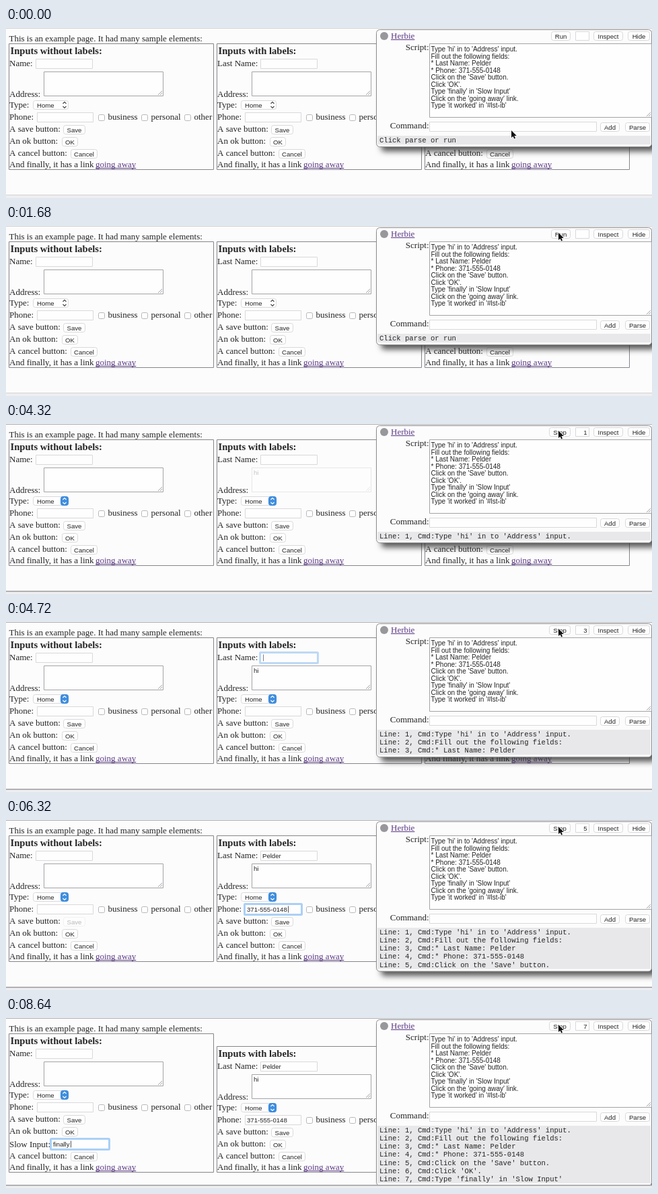
An HTML page with a canvas for the animation above (8720 ms loop, 960 by 254 pixels).

```html
<!DOCTYPE html>
<html lang="en">
<head>
<meta charset="utf-8">
<title>Form script demo</title>
<style>
html, body { margin: 0; width: 960px; height: 254px; overflow: hidden; background: #fcfcfc; }
canvas { display: block; }
</style>
</head>
<body>
<canvas id="stage" width="960" height="254"></canvas>
<script>
const ctx = document.getElementById('stage').getContext('2d');
const LOOP = 8720, STEP = 80;
const SERIF = '13px "Liberation Serif", serif';
const BOLD = 'bold 14.6px "Liberation Serif", serif';
const SANS = '9.6px "Liberation Sans", sans-serif';
const AREA = '10px "Liberation Sans", sans-serif';
const MONO = '10.55px "Liberation Mono", monospace';
const INK = '#242424', PAGE = '#fcfcfc', WHITE = '#fefefe', PALE = '#d9d9dc',
      EDGE = '#a4a4a8', LOG = '#e8e8ea', LINK = '#5c3a86';

const LAST = 'Pelder', PHONE = '371-555-0148';
const SCRIPT = [
  "Type 'hi' in to 'Address' input.",
  'Fill out the following fields:',
  '* Last Name: ' + LAST,
  '* Phone: ' + PHONE,
  "Click on the 'Save' button.",
  "Click 'OK'.",
  "Type 'finally' in 'Slow Input'",
  "Click on the 'going away' link.",
  "Type 'it worked' in '#lst-ib'"
];

// Start time of each script line, and the other events
const LINES = [4200, 4600, 4680, 5120, 6210, 7000, 8120];
const CLICK = 3200, SLOW = 8000, FADE = 160, GROW = 19;

function text(s, x, y, font = SERIF, color = INK, align = 'left') {
  ctx.font = font;
  ctx.fillStyle = color;
  ctx.textAlign = align;
  ctx.fillText(s, x, y);
  return ctx.measureText(s).width;
}

function box(x, y, w, h, fill, stroke, r = 0) {
  ctx.beginPath();
  ctx.roundRect(x + .5, y + .5, w - 1, h - 1, r);
  if (fill) { ctx.fillStyle = fill; ctx.fill(); }
  if (stroke) { ctx.strokeStyle = stroke; ctx.lineWidth = 1; ctx.stroke(); }
}

function faded(alpha, draw) {
  ctx.save();
  ctx.globalAlpha = alpha;
  draw();
  ctx.restore();
}

function button(label, x, y, w) {
  box(x, y, w, 14, WHITE, PALE, 3);
  text(label, x + w / 2, y + 10.5, SANS, INK, 'center');
}

function caret(x, y) {
  ctx.fillStyle = '#555';
  ctx.fillRect(Math.round(x), y, 1, 10);
}

function field(x, y, w, value = '', focus = false, blink = false) {
  box(x, y, w, 15, WHITE, PALE);
  if (focus) {
    ctx.strokeStyle = '#abd0f6';
    ctx.lineWidth = 3;
    ctx.beginPath();
    ctx.roundRect(x - .5, y - .5, w + 1, 16, 1);
    ctx.stroke();
  }
  const end = text(value, x + 3, y + 11, SANS);
  if (focus && blink) caret(x + 4 + end, y + 2.5);
}

function grip(x, y) {
  ctx.strokeStyle = EDGE;
  ctx.lineWidth = 1;
  ctx.beginPath();
  for (const d of [3, 6]) {
    ctx.moveTo(x - d, y);
    ctx.lineTo(x, y - d);
  }
  ctx.stroke();
}

function area(x, y, w, h) {
  box(x, y, w, h, WHITE, EDGE);
  grip(x + w - 2, y + h - 2);
}

function link(s, x, y) {
  const w = text(s, x, y, SERIF, LINK);
  ctx.fillStyle = LINK;
  ctx.fillRect(x, y + 1, w, 1);
}

function select(x, y, active) {
  box(x, y, 53, 14, WHITE, PALE, 3);
  text('Home', x + 6, y + 10.5, SANS);
  if (active) box(x + 41, y, 12, 14, '#3f8fe0', '#3a84d2', 3);
  ctx.strokeStyle = active ? '#fff' : '#444';
  ctx.lineWidth = 1.2;
  ctx.beginPath();
  for (const d of [-1, 1]) {
    ctx.moveTo(x + 44.5, y + 7 + d * 2);
    ctx.lineTo(x + 47, y + 7 + d * 4.5);
    ctx.lineTo(x + 49.5, y + 7 + d * 2);
  }
  ctx.stroke();
}

// Flash of the element that a script line touches
function flash(line, t) {
  const d = t - LINES[line - 1];
  return d < 0 || d > 2 * FADE ? 1 : Math.abs(d - FADE) / FADE;
}

function typed(s, start, span, t) {
  const p = Math.min(1, Math.max(0, (t - start) / span));
  return s.slice(0, Math.round(s.length * p));
}

function column(x, dy, t, o) {
  const extra = o.slow ? GROW : 0;
  const active = t >= CLICK;
  const blink = o.blink;
  ctx.save();
  ctx.translate(x, dy);
  box(0, 23, 305, 189 + extra, null, '#85858c');
  text(o.title, 2.5, 39, BOLD);
  text(o.first, 1, 57);
  faded(o.nameFade, () => field(o.nameX, 46, 85, o.name, o.focus === 'name', blink));
  text('Address:', 1, 103);
  faded(o.addressFade, () => {
    area(52, 65, 178, 37);
    text(o.address, 55, 76, SANS);
  });
  text('Type:', 1, 119);
  select(36, 108, active);
  text('Phone:', 1, 137);
  faded(o.phoneFade, () => field(42, 126, 84, o.phone, o.focus === 'phone', blink));
  [[133, 'business'], [197, 'personal'], [261, 'other']].forEach(([cx, s]) => {
    box(cx, 129, 10, 10, WHITE, '#b8b8bc', 2);
    text(s, cx + 14.5, 137);
  });
  text('A save button:', 1, 155);
  faded(o.saveFade, () => button('Save', 81, 145, 33));
  text('An ok button:', 1, 173);
  faded(o.okFade, () => button('OK', 79, 163, 24));
  if (o.slow) {
    text('Slow Input:', 1, 192.5);
    faded(flash(7, t), () => field(63, 181, 86, o.slowText, o.focus === 'slow', blink));
  }
  ctx.translate(0, extra);
  text('A cancel button:', 1, 191);
  button('Cancel', 92, 181, 40);
  text('And finally, it has a link', 1, 208);
  link('going away', 129, 208);
  ctx.restore();
}

function page(t) {
  ctx.fillStyle = PAGE;
  ctx.fillRect(0, 0, 960, 254);
  text('This is an example page. It had many sample elements:', 4.5, 20);

  const slow = t >= SLOW;
  const shift = slow ? GROW : 0;
  const plain = {
    title: 'Inputs without labels:', first: 'Name:', nameX: 40,
    name: '', address: '', phone: '', slowText: '', focus: '',
    nameFade: 1, addressFade: 1, phoneFade: 1, saveFade: 1, okFade: 1, slow: false
  };
  const left = {
    ...plain, slow, saveFade: flash(5, t), okFade: flash(6, t),
    slowText: typed('finally', LINES[6] + 120, 320, t),
    focus: t >= LINES[6] ? 'slow' : '',
    blink: true
  };
  const focus = t >= LINES[6] ? '' : t >= LINES[3] ? 'phone' : t >= LINES[2] ? 'name' : '';
  const right = {
    ...plain, title: 'Inputs with labels:', first: 'Last Name:', nameX: 65,
    addressFade: flash(1, t), nameFade: flash(3, t), phoneFade: flash(4, t),
    address: typed('hi', LINES[0], 80, t),
    name: typed(LAST, LINES[2] + 80, 240, t),
    phone: typed(PHONE, LINES[3] + 160, 400, t),
    focus, blink: Math.floor((t - 5840) / 560) % 2 === 0
  };
  column(4, 0, t, left);
  column(313, shift, t, right);
  column(622, shift, t, { ...plain, title: 'Inputs in a table:' });
}

function panel(t) {
  const count = LINES.filter(s => t >= s).length;
  const extra = Math.max(0, count - 1) * 12.15;
  const bottom = 178 + extra;

  ctx.save();
  ctx.shadowColor = 'rgba(50,50,50,.8)';
  ctx.shadowBlur = 8;
  ctx.shadowOffsetX = 7;
  ctx.shadowOffsetY = 7;
  box(550, 2, 410, bottom - 2, PAGE, null, 5);
  ctx.restore();
  box(550, 2, 410, bottom - 2, PAGE, '#8c8c90', 5);

  ctx.fillStyle = '#98989c';
  ctx.beginPath();
  ctx.arc(562, 12, 6, 0, 7);
  ctx.fill();
  link('Herbie', 572, 16);

  if (t >= CLICK) button('Stop', 807, 5, 32);
  else button('Run', 810, 5, 29);
  box(846, 5, 21, 14, WHITE, PALE);
  if (count) text(count, 861, 15.5, SANS, INK, 'center');
  button('Inspect', 873, 5, 44);
  button('Hide', 924, 5, 33);

  text('Script:', 628.5, 33, SERIF, INK, 'right');
  area(629, 23, 331, 111);
  SCRIPT.forEach((s, i) => text(s, 631.5, 35 + i * 10.55, AREA));

  text('Command:', 628.5, 150, SERIF, INK, 'right');
  box(629, 140, 249, 15, WHITE, PALE);
  button('Add', 883, 141, 29);
  button('Parse', 920, 141, 37);

  ctx.fillStyle = LOG;
  ctx.fillRect(552, 161, 406, 13 + extra);
  if (!count) text('Click parse or run', 555, 171, MONO);
  for (let i = 0; i < count; i++) {
    text(`Line: ${i + 1}, Cmd:${SCRIPT[i]}`, 555, 171 + i * 12.15, MONO);
  }
}

function frameEdges(t) {
  const active = t >= CLICK;
  ctx.fillStyle = '#eeeef0';
  ctx.fillRect(0, 250, 960, 4);
  ctx.fillStyle = active ? '#b0b0b4' : '#d2d2d4';
  ctx.fillRect(0, 0, 960, 1);
  ctx.fillRect(0, 249, 960, active ? 2 : 1);
}

function pointer(t) {
  const p = Math.min(1, Math.max(0, (t - 500) / 1000));
  const e = p * p * (3 - 2 * p);
  ctx.save();
  ctx.translate(751 + 70 * e, 153 - 143 * e);
  ctx.beginPath();
  [[0, 0], [0, 11], [2.5, 8.7], [4.2, 12.5], [6, 11.7], [4.4, 8], [7.8, 8]]
    .forEach(q => ctx.lineTo(...q));
  ctx.closePath();
  ctx.strokeStyle = '#fff';
  ctx.lineWidth = 1.5;
  ctx.stroke();
  ctx.fillStyle = '#111';
  ctx.fill();
  ctx.restore();
}

function render(now) {
  const t = Math.floor((now % LOOP) / STEP) * STEP;
  page(t);
  panel(t);
  frameEdges(t);
  pointer(t);
}

let origin;
function tick(now) {
  origin ??= now;
  render(now - origin);
  requestAnimationFrame(tick);
}
render(0);
requestAnimationFrame(tick);
</script>
</body>
</html>
```
